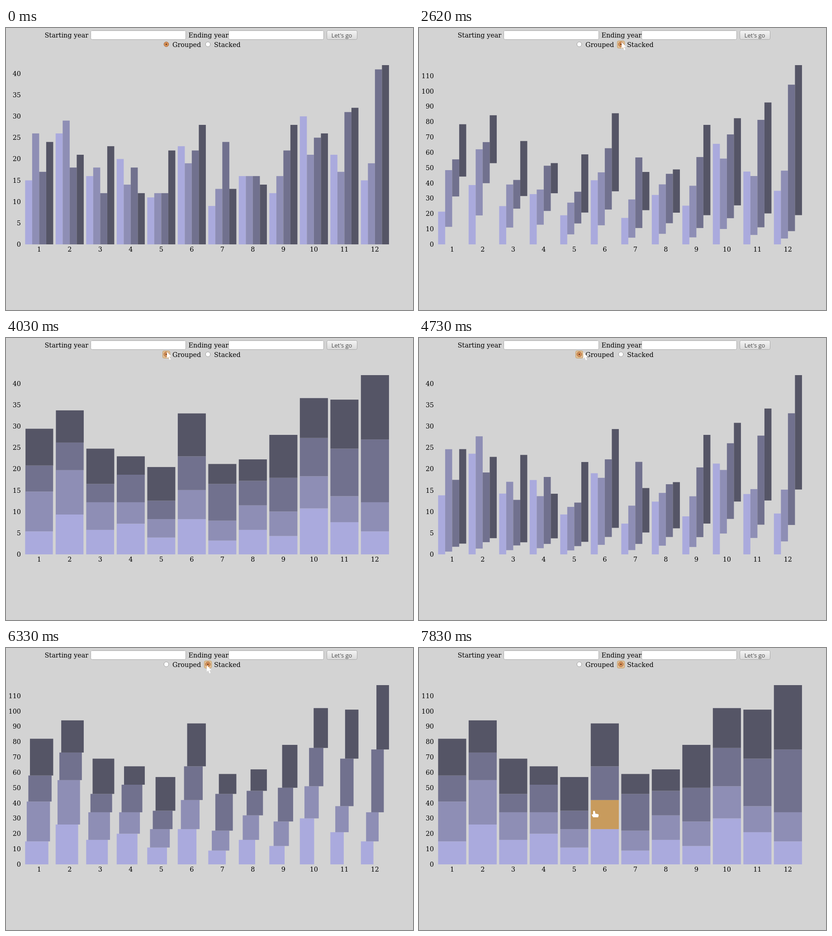
An HTML page with a canvas that plays this animation: 900 by 623 pixels, repeating every 8000 ms.

```html
<!DOCTYPE html>
<html lang="en">
<head>
<meta charset="utf-8">
<title>Grouped and stacked bars</title>
<style>
html, body { margin: 0; width: 100%; height: 100%; overflow: hidden; background: #d3d3d3; }
canvas { display: block; }
</style>
</head>
<body>
<canvas id="stage" width="900" height="623"></canvas>
<script>
const ctx = document.getElementById('stage').getContext('2d');
const LOOP = 8000, STEP = 459, STAGGER = 8.8;
const BASE = 478, HEIGHT = 396, LEFT = 42.3, BAND = 67.5, WIDTH = 62.1;
const COLORS = ['#aaaadd', '#8e8eb5', '#71718e', '#555566'];
const HOVER = '#c89b5d';
// The chart's values: four series for each of twelve months
const DATA = [
  [15, 26, 17, 24], [26, 29, 18, 21], [16, 18, 12, 23], [20, 14, 18, 12],
  [11, 12, 12, 22], [23, 19, 22, 28], [9, 13, 24, 13], [16, 16, 16, 14],
  [12, 16, 22, 28], [30, 21, 25, 26], [21, 17, 31, 32], [15, 19, 41, 42]
];
const sum = list => list.reduce((a, b) => a + b, 0);
const MAX_GROUPED = Math.max(...DATA.flat());
const MAX_STACKED = Math.max(...DATA.map(sum));
// Each click toggles the layout, grouped first
const CLICKS = [2341, 3956, 5590];
// Pointer tip: time, x, y
const PATH = [
  [750, 845, 330], [1220, 163, 235], [1540, 497, 31], [1660, 463, 31],
  [1930, 448, 31], [3400, 448, 31], [3860, 354, 30], [4730, 363, 31],
  [5290, 444, 38], [6700, 444, 38], [7110, 470, 345], [7500, 230, 440],
  [7830, 386, 361]
];

const mix = (a, b, k) => a + (b - a) * k;
const ease = v => {
  v = Math.max(0, Math.min(1, v));
  return v < .5 ? 4 * v ** 3 : 1 - 4 * (1 - v) ** 3;
};

function layout(t) {
  const past = CLICKS.filter(c => c <= t);
  return { start: past.length ? past.pop() : -LOOP, stacked: CLICKS.filter(c => c <= t).length % 2 === 1 };
}

// Stacking moves heights first, then widths; grouping runs the other way round
function bars(t, { start, stacked }) {
  return COLORS.flatMap((color, s) => DATA.map((row, i) => {
    const k = (t - start - i * STAGGER) / STEP;
    const first = ease(k), second = ease(k - 1);
    const tall = stacked ? first : 1 - second;
    const wide = stacked ? second : 1 - first;
    const h = HEIGHT * row[s] * mix(1 / MAX_GROUPED, 1 / MAX_STACKED, tall);
    const lift = HEIGHT * sum(row.slice(0, s)) / MAX_STACKED * tall;
    return {
      x: LEFT + BAND * i + WIDTH / 4 * s * (1 - wide), y: BASE - lift - h,
      w: mix(WIDTH / 4, WIDTH, wide), h, color
    };
  }));
}

function pointer(t) {
  if (t < PATH[0][0]) return null;
  const n = PATH.findIndex(p => p[0] > t);
  if (n < 0) return PATH[PATH.length - 1].slice(1);
  const a = PATH[n - 1], b = PATH[n], k = (t - a[0]) / (b[0] - a[0]);
  return [mix(a[1], b[1], k), mix(a[2], b[2], k)];
}

function text(str, x, y, align = 'left', font = '14.4px "DejaVu Serif", serif', color = '#000') {
  ctx.font = font;
  ctx.textAlign = align;
  ctx.fillStyle = color;
  ctx.fillText(str, x, y);
}

function paint(fill, stroke) {
  ctx.fillStyle = fill;
  ctx.fill();
  ctx.strokeStyle = stroke;
  ctx.stroke();
}

function box(x, y, w, h, fill, stroke) {
  ctx.beginPath();
  ctx.roundRect(x, y, w, h, 3);
  paint(fill, stroke);
}

function disc(x, y, r, fill, stroke) {
  ctx.beginPath();
  ctx.arc(x, y, r, 0, 7);
  paint(fill, stroke);
}

function field(label, labelX, x) {
  text(label, labelX, 21);
  box(x, 5.5, 210, 20, '#fff', '#a9a9a9');
  ctx.fillStyle = '#e6e6e6';
  ctx.fillRect(x + 1, 6, 208, 1);
}

function radio(label, x, checked, hover) {
  if (hover) box(x - 8, 28.5, 16, 16, '#e2c197', '#c39a62');
  disc(x, 36, 5.3, checked ? '#d8935a' : '#fff', checked ? '#a4673b' : '#9c9c9c');
  if (checked) disc(x, 36, 1.3, '#6b3d20', '#6b3d20');
  text(label, x + 13.5, 42);
}

function form(stacked, hovered) {
  field('Starting year', 85.5, 187.5);
  field('Ending year', 403.5, 492.5);
  const shade = ctx.createLinearGradient(0, 6, 0, 26);
  shade.addColorStop(0, '#f4f4f4');
  shade.addColorStop(1, '#d9d9d9');
  box(709.5, 5.5, 67, 20, shade, '#a9a9a9');
  text("Let's go", 742.5, 20.5, 'center', '13px "Open Sans", sans-serif', '#4c4c4c');
  radio('Grouped', 354.5, !stacked, hovered === 'grouped');
  radio('Stacked', 446.5, stacked, hovered === 'stacked');
}

function axes(stacked) {
  const max = stacked ? MAX_STACKED : MAX_GROUPED, step = stacked ? 10 : 5;
  for (let v = 0; v <= max; v += step) text(v, 33, BASE + 5 - HEIGHT * v / max, 'right');
  DATA.forEach((_, i) => text(i + 1, LEFT + BAND * i + WIDTH / 2, 494, 'center'));
}

function cursor([x, y], hand) {
  const shape = hand
    ? 'M-1 0Q1-3 3 0L4 5L10 6Q12 7 11 10L10 13H-1L-4 8Q-4 5-1 7Z'
    : 'M0 0V14.5L3.3 11.5L5.8 18L8.4 17L5.8 10.8H10Z';
  ctx.save();
  ctx.translate(x, y);
  ctx.fillStyle = '#fff';
  ctx.fill(new Path2D(shape));
  ctx.restore();
}

function draw(t) {
  const state = layout(t), tip = pointer(t), list = bars(t, state);
  const hit = tip && list.findLast(b =>
    tip[0] >= b.x && tip[0] < b.x + b.w && tip[1] >= b.y && tip[1] < b.y + b.h);
  const hovered = t < 2310 ? '' : t < 3560 || t >= 5490 ? 'stacked' : 'grouped';
  ctx.fillStyle = '#d3d3d3';
  ctx.fillRect(0, 0, 900, 623);
  form(state.stacked, hovered);
  for (const b of list) {
    ctx.fillStyle = b === hit ? HOVER : b.color;
    ctx.fillRect(b.x, b.y, b.w, b.h);
  }
  axes(state.stacked);
  if (tip) cursor(tip, hit);
}

function tick() {
  draw(performance.now() % LOOP);
  requestAnimationFrame(tick);
}
tick();
</script>
</body>
</html>
```
